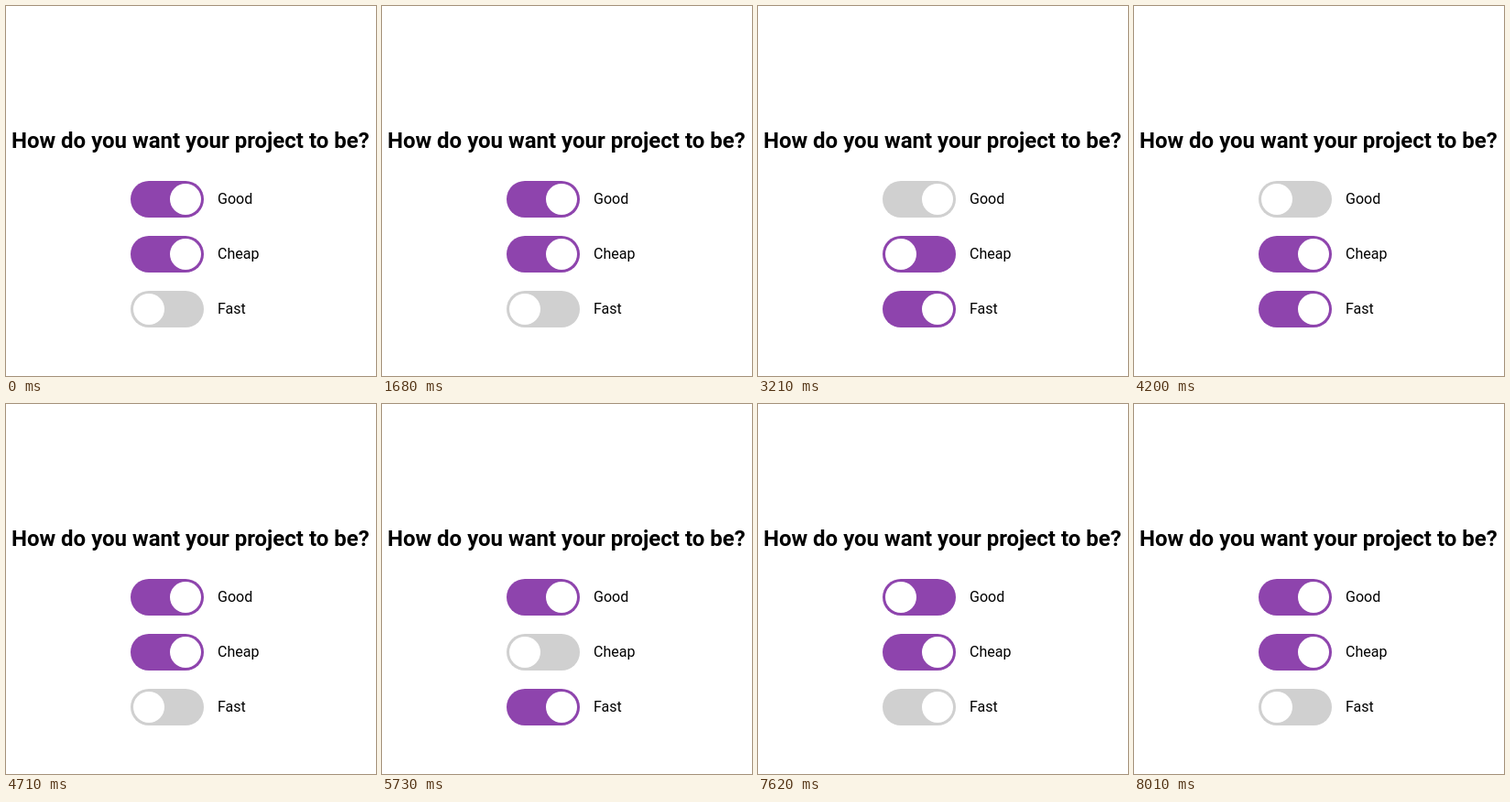
Write an HTML page that moves like this. It is 404 px wide and 404 px high and loops after 8.73 s.

```html
<!DOCTYPE html>
<html lang="en">
<head>
<meta charset="utf-8">
<title>Pick two</title>
<style>
  html, body { margin: 0; width: 100%; height: 100%; overflow: hidden; background: #fff; }
  svg { display: block; font: 16px Roboto, sans-serif; }
  h2, .title { font-size: 24px; font-weight: 700; }
</style>
</head>
<body>
<svg id="stage" width="404" height="404" viewBox="0 0 404 404">
  <text class="title" x="201.3" y="155" text-anchor="middle">How do you want your project to be?</text>
</svg>
<script>
const LOOP = 8730, STEP = 30, ON = '#8e44ad', OFF = '#d0d0d0';
const names = ['Good', 'Cheap', 'Fast'];

// Each move: start, duration, switch turned on, switch turned off
const moves = [
  [2020, 270, 2, 1],
  [3210, 210, 1, 0],
  [4470, 240, 0, 2],
  [5460, 270, 2, 1],
  [6270, 210, 1, 0],
  [7620, 270, 0, 2],
];

const stage = document.getElementById('stage');

function add(tag, attrs) {
  const el = document.createElementNS('http://www.w3.org/2000/svg', tag);
  for (const key in attrs) el.setAttribute(key, attrs[key]);
  return stage.appendChild(el);
}

const switches = names.map((name, i) => {
  const y = 191 + i * 60;
  const track = add('rect', { x: 136, y, width: 80, height: 40, rx: 20 });
  const ball = add('circle', { cy: y + 20, fill: '#fff' });
  add('text', { x: 231, y: y + 25 }).textContent = name;
  return { track, ball };
});

function draw(now) {
  const t = Math.floor((now % LOOP) / STEP) * STEP;
  const on = [true, true, false];
  const progress = [1, 1, 1];
  for (const [start, duration, up, down] of moves) {
    if (t < start) break;
    on[up] = true;
    on[down] = false;
    progress.fill(1);
    progress[up] = progress[down] = Math.min(1, (t - start) / duration);
  }
  switches.forEach(({ track, ball }, i) => {
    const p = progress[i];
    const swell = 1 + 0.2 * (1 - Math.abs(2 * p - 1));
    track.setAttribute('fill', on[i] ? ON : OFF);
    ball.setAttribute('cx', 156 + 40 * (on[i] ? p : 1 - p));
    ball.setAttribute('r', 17 * swell);
  });
}

function tick() {
  draw(performance.now());
  requestAnimationFrame(tick);
}
tick();
</script>
</body>
</html>
```
